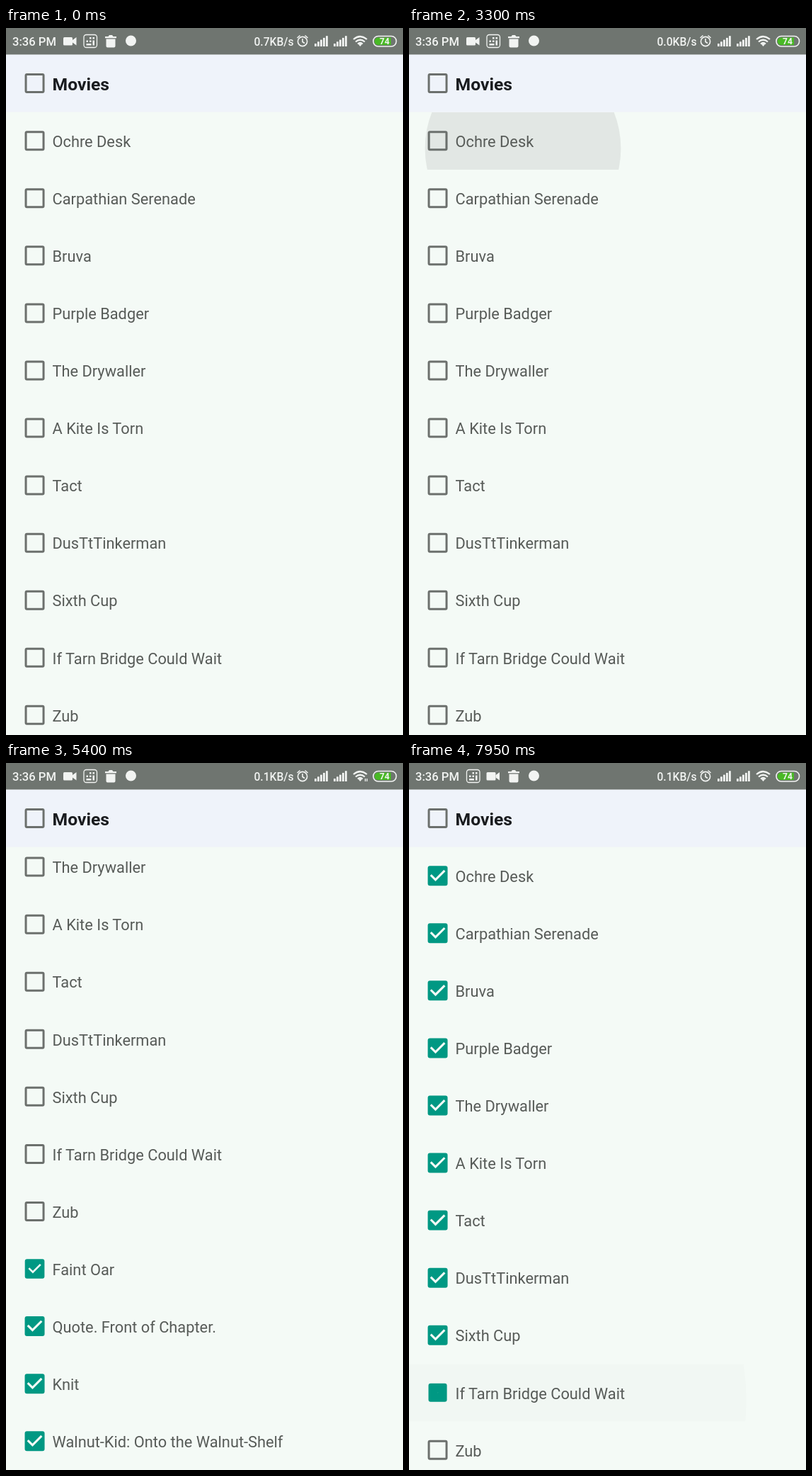
These frames come from a looping animation (561x998 px, 8000 ms). An HTML page:

```html
<!DOCTYPE html>
<html lang="en">
<head>
<meta charset="utf-8">
<title>Checklist</title>
<style>
  html, body { margin: 0; width: 100%; height: 100%; overflow: hidden; background: #f4faf6; }
  svg { display: block; }
  text { font-family: Roboto, sans-serif; font-size: 21.8px; fill: #575b58; }
  .header text { font-size: 24.7px; font-weight: 700; fill: #1a1c1f; }
  .status { fill: #f2f4f2; stroke: none; }
  .status text { font-size: 16.6px; font-weight: 500; fill: #f2f4f2; }
  .status .speed { font-size: 15.6px; }
  .status .charge { font-size: 12px; font-weight: 700; }
  .line { fill: none; stroke: #f2f4f2; stroke-width: 1.6; }
  .tick { fill: none; stroke: #f4faf6; stroke-width: 3.1; }
</style>
</head>
<body>
<svg id="stage" width="561" height="998" viewBox="0 0 561 998">
  <rect width="561" height="998" fill="#f4faf6"/>
  <svg id="list" y="119" width="561" height="879">
    <g id="rows"></g>
    <rect id="thumb" x="555" width="6" fill="#afb3b0"/>
  </svg>
  <g class="status">
    <rect width="561" height="37.500" fill="#6f7570"/>
    <text x="9" y="25">3:36 PM</text>
    <g id="camera">
      <rect x="81" y="13" width="13" height="11.5" rx="1.5"/>
      <path d="M94 17l5.5-4v11.5l-5.5-4z"/>
    </g>
    <g id="keypad">
      <rect class="line" x="110" y="9.5" width="18.5" height="18" rx="3.5" style="stroke-width:1.3"/>
      <path d="M118 13h2.5v2.5h-2.5zM122.5 13h2.5v2.5h-2.5zM113.5 17.5h2.5v2.5h-2.5zM118 17.5h2.5v2.5h-2.5zM122.5 17.5h2.5v7h-2.5zM113.5 22h7v2.5h-7z"/>
    </g>
    <path d="M140 12h4.5l1.5-2h4l1.5 2h4.5v2.2h-16zM141.5 15.5h13v10q0 2-2 2h-9q-2 0-2-2z"/>
    <circle cx="176.5" cy="18" r="7.5"/>
    <text id="speed" class="speed" x="350.5" y="24.5">0.7KB/s</text>
    <g class="line">
      <circle cx="419" cy="19" r="6.6"/>
      <path d="M419 15v4.5l3 2M411.5 14l4-3.5M426.5 14l-4-3.5"/>
    </g>
    <g id="signals"></g>
    <g class="line" style="stroke-width:2.2">
      <path d="M491 16q9.5-8 19 0M494 19.5q6.500-5.5 13 0"/>
      <path d="M497 22.5q3.5-3 7 0"/>
    </g>
    <path d="M498 23q2.5-2 5 0l-2.5 3z"/>
    <path id="traffic" d="M507 26v-4h1.3v4zM509.5 26v-4h1.3v4z"/>
    <rect class="line" x="519" y="11.5" width="32.5" height="14.5" rx="7"/>
    <path d="M526 13.5h18v10.5h-18a5.25 5.25 0 0 1 0-10.5z" fill="#49b925"/>
    <text class="charge" x="535" y="23" text-anchor="middle">74</text>
  </g>
</svg>
<script>
const LOOP = 8000, PITCH = 81.06, VIEW = 879;
const CHECK_ALL = 1940, UNCHECK_ALL = 2590, CHECK_MS = 240;
const GREY = [108, 112, 109], TEAL = [0, 152, 131];
const BOX = { x: 40.55, y: 40.25, size: 28, border: 3 };

// title, time it gets ticked on its own
const items = [
  ['Ochre Desk', 3300], ['Carpathian Serenade', 3450], ['Bruva', 3600],
  ['Purple Badger', 6755], ['The Drywaller', 6850], ['A Kite Is Torn', 7150],
  ['Tact', 7230], ['DusTtTinkerman', 7310], ['Sixth Cup', 7600],
  ['If Tarn Bridge Could Wait', 7825], ['Zub'], ['Faint Oar', 5180],
  ['Quote. Front of Chapter.', 4850], ['Knit', 4670],
  ['Walnut-Kid: Onto the Walnut-Shelf', 4455]
];
const MAX_SCROLL = items.length * PITCH - VIEW;

const $ = id => document.getElementById(id);
const clamp = x => Math.min(1, Math.max(0, x));
const ramp = (t, start, length) => clamp((t - start) / length);
const ease = x => (1 - Math.cos(Math.PI * x)) / 2;

function add(parent, tag, attrs) {
  const el = document.createElementNS('http://www.w3.org/2000/svg', tag);
  set(el, attrs);
  return parent.appendChild(el);
}
function set(el, attrs) {
  for (const name in attrs) el.setAttribute(name, attrs[name]);
}

function makeRow(parent, y, title, tickAt = Infinity, header = false) {
  const row = add(parent, 'svg', { y, width: 561, height: PITCH });
  if (header) {
    row.classList.add('header');
    add(row, 'rect', { width: 561, height: PITCH, fill: '#eff3fa' });
  }
  const ripple = add(row, 'circle', { cx: 161, cy: 51 });
  const box = add(row, 'path', { 'fill-rule': 'evenodd' });
  const tick = add(row, 'path', { class: 'tick', d: 'M-9.8-1.1L-3.1 5.6L9.8-7.3' });
  add(row, 'text', { x: 65.5, y: header ? 50 : 49 }).textContent = title;
  const taps = header ? [CHECK_ALL, UNCHECK_ALL] : [tickAt];
  return { ripple, box, tick, tickAt, taps };
}

// Rounded square with a square hole, centred on the checkbox
function boxPath(size, border) {
  const r = 3, side = size - 2 * r, hole = Math.max(0, size - 2 * border);
  const arc = (x, y) => `a${r} ${r} 0 0 1 ${x} ${y}`;
  return `M${BOX.x - side / 2} ${BOX.y - size / 2}h${side}${arc(r, r)}v${side}${arc(-r, r)}` +
    `h${-side}${arc(-r, -r)}v${-side}${arc(r, -r)}z` +
    `M${BOX.x - hole / 2} ${BOX.y - hole / 2}h${hole}v${hole}h${-hole}z`;
}

function drawRow({ ripple, box, tick, tickAt, taps }, t) {
  const p = ramp(t, CHECK_ALL, CHECK_MS) - ramp(t, UNCHECK_ALL, CHECK_MS) + ramp(t, tickAt, CHECK_MS);
  const fill = clamp(p * 2), mark = clamp(p * 2 - 1);
  const size = BOX.size - 2 * (fill - mark);
  const border = BOX.border + (size / 2 - BOX.border) * fill;
  const color = GREY.map((c, i) => Math.round(c + (TEAL[i] - c) * fill));
  set(box, { d: boxPath(size, border), fill: `rgb(${color})` });
  set(tick, {
    transform: `translate(${BOX.x} ${BOX.y}) scale(${mark})`,
    visibility: mark > 0 ? 'visible' : 'hidden'
  });

  // The ripple starts on touch, shortly before the box reacts
  const tap = taps.find(at => t > at - 90 && t < at + 150);
  const since = t - tap;
  set(ripple, tap === undefined ? { r: 0 } : {
    r: 137 + 1.42 * since,
    'fill-opacity': 0.095 * (1 - ramp(since, -45, 195))
  });
}

const rows = items.map(([title, at], i) => makeRow($('rows'), i * PITCH, title, at));
rows.push(makeRow($('stage'), 37.7, 'Movies', Infinity, true));

for (const x of [436, 463])
  for (let i = 0; i < 5; i++) {
    const height = 4 + i * 2.7;
    add($('signals'), 'rect', { x: x + i * 4, y: 26 - height, width: 2.8, height });
  }

function draw(now) {
  const t = now % LOOP;
  const scroll = MAX_SCROLL * (ease(ramp(t, 3700, 340)) - ease(ramp(t, 5650, 753)));
  const scale = VIEW / (MAX_SCROLL + VIEW);
  const shown = t < 5000
    ? (t > 3700) * (1 - ramp(t, 4300, 250))
    : (t > 5650) * (1 - ramp(t, 6450, 150));

  rows.forEach(row => drawRow(row, t));
  set($('rows'), { transform: `translate(0 ${-scroll})` });
  set($('thumb'), { y: scroll * scale, height: VIEW * scale, opacity: shown });

  const swap = t >= 6900 ? 28.5 : 0;
  set($('camera'), { transform: `translate(${swap})` });
  set($('keypad'), { transform: `translate(${-swap})` });
  $('speed').textContent = (t < 1900 ? '0.7' : t < 3500 ? '0.0' : '0.1') + 'KB/s';
  const busy = (t >= 4900 && t < 5500) || (t >= 6050 && t < 7400);
  set($('traffic'), { visibility: busy ? 'visible' : 'hidden' });
  requestAnimationFrame(draw);
}
draw(performance.now());
</script>
</body>
</html>
```
